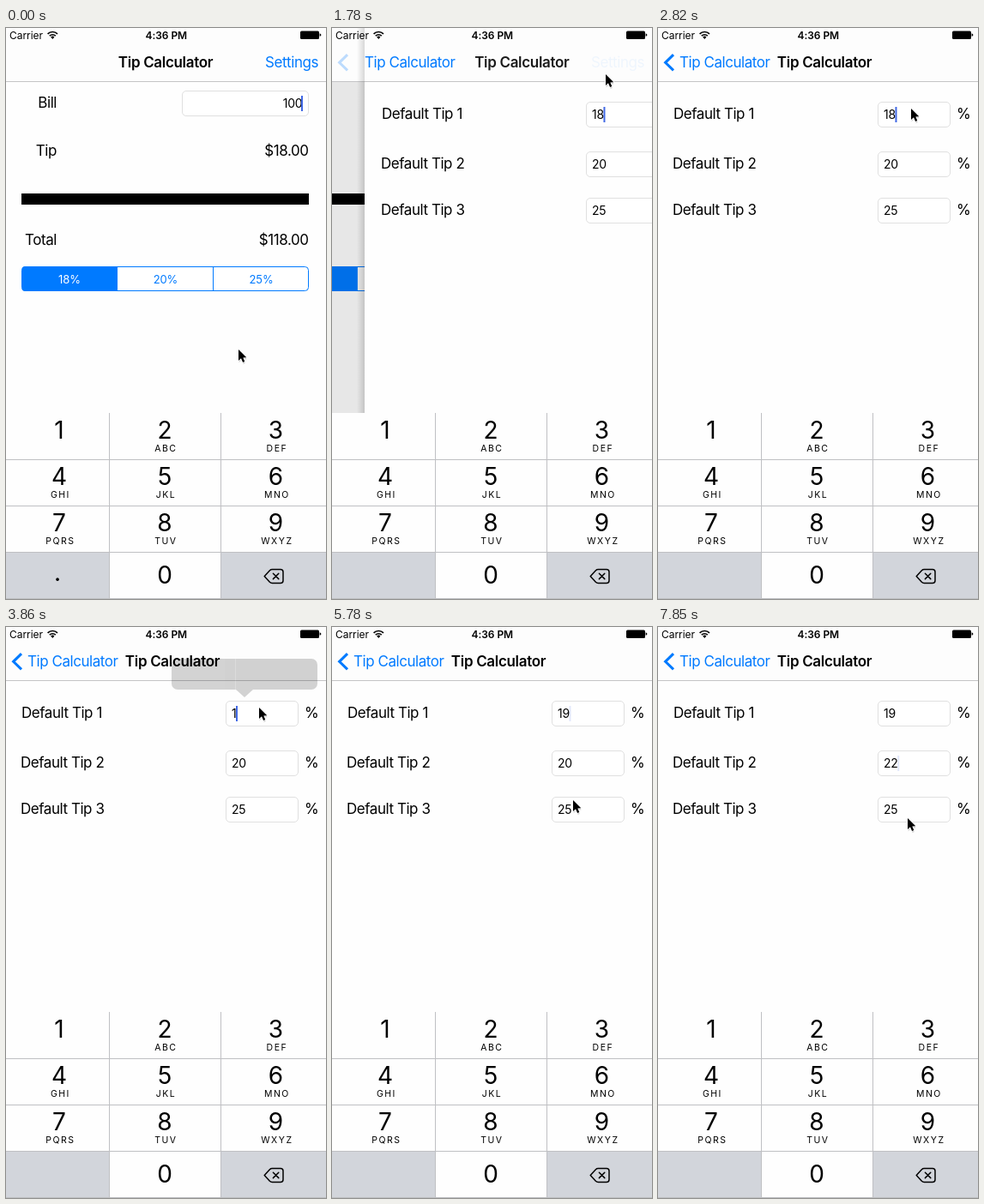
Animation of 373x666 px, one loop 8 s. Source, as an HTML page:

```html
<!DOCTYPE html>
<html lang="en">
<head>
<meta charset="utf-8">
<title>Tip Calculator</title>
<style>
  html, body { margin: 0; width: 100%; height: 100%; overflow: hidden; background: #fefefe; }
  svg { display: block; width: 373px; height: 666px; }
  text { font: 400 17px Inter, Roboto, sans-serif; letter-spacing: -.45px; fill: #000; white-space: pre; }
  .end { text-anchor: end; }
  .mid { text-anchor: middle; }
  .bold { font-weight: 600; letter-spacing: -.32px; }
  .blue { fill: #007aff; }
  .bar { font-size: 12px; letter-spacing: -.05px; }
  .input { font-size: 14px; letter-spacing: -.2px; }
  .seg { font-size: 13px; letter-spacing: -.1px; text-anchor: middle; }
  .digit { font-size: 28px; letter-spacing: 0; text-anchor: middle; }
  .abc { font-size: 10.5px; letter-spacing: 1.5px; text-anchor: middle; }
  .box { fill: #fff; stroke: #e0e0e0; }
  .caret { fill: #4068e4; }
</style>
</head>
<body>
<svg viewBox="0 0 373 666">
  <defs>
    <linearGradient id="edge">
      <stop offset="0" stop-opacity="0"/>
      <stop offset="1" stop-opacity=".15"/>
    </linearGradient>
  </defs>
  <rect width="373" height="666" fill="#fefefe"/>

  <g id="home">
    <text class="end" x="59" y="92.5">Bill</text>
    <rect class="box" x="205.5" y="73.5" width="147" height="29" rx="4.5"/>
    <text class="input end" x="345.5" y="93">100</text>
    <rect class="caret" id="billCaret" x="344" y="79" width="2" height="18"/>
    <text class="end" x="59" y="148.5">Tip</text>
    <text class="end" x="352.5" y="148.5">$18.00</text>
    <rect x="18" y="193" width="335" height="13"/>
    <text class="end" x="59" y="252.5">Total</text>
    <text class="end" x="352.5" y="252.5">$118.00</text>
    <rect x="18.5" y="278.5" width="334" height="28" rx="4" fill="#fff" stroke="#007aff"/>
    <path d="M130 278H22.5a4 4 0 0 0-4 4v21a4 4 0 0 0 4 4H130z" fill="#007aff"/>
    <path d="M241.5 278v29" stroke="#007aff"/>
    <text class="seg" x="74" y="297.5" style="fill:#fff">18%</text>
    <text class="seg blue" x="186" y="297.5">20%</text>
    <text class="seg blue" x="297.5" y="297.5">25%</text>
  </g>
  <rect id="dim" y="63" width="373" height="400"/>

  <g id="settings">
    <rect x="-2" y="63" width="375" height="400" fill="#fefefe"/>
    <g id="rows"></g>
    <rect class="caret" id="tipCaret" width="2" height="18"/>
  </g>

  <rect width="373" height="62" fill="#fdfdfd"/>
  <path d="M0 62.5H373" stroke="#c4c4c6"/>
  <rect id="shadow" x="-11" width="9" height="449" fill="url(#edge)"/>
  <text class="bar" x="4" y="12.5">Carrier</text>
  <g fill="none" stroke="#000" stroke-width="1.7">
    <path d="M48.6 6.9a8 8 0 0 1 11.4 0"/>
    <path d="M50.8 9.2a5 5 0 0 1 7 0"/>
  </g>
  <path d="M52.2 10.6a3 3 0 0 1 4.2 0L54.3 13z"/>
  <text class="bar mid" x="186.8" y="12.5" style="font-weight:600">4:36 PM</text>
  <rect x="343" y="3.5" width="22" height="9.5" rx="1.5"/>
  <path d="M365.6 6.2q1.8 .4 1.8 1.8t-1.8 1.8z"/>

  <text class="bold mid" id="oldTitle" y="46.2">Tip Calculator</text>
  <text class="blue end" id="link" x="364" y="46.2">Settings</text>
  <path id="chevron" d="M18 31.2L8.6 40.3L18 49.4" fill="none" stroke="#007aff" stroke-width="3"/>
  <text class="blue" id="back" y="46.2">Tip Calculator</text>
  <text class="bold mid" id="newTitle" y="46.2">Tip Calculator</text>

  <g id="pad">
    <rect y="449" width="373" height="217" fill="#fefefe"/>
    <path d="M0 612H120V666H0zM251 612H373V666H251z" fill="#d2d5db"/>
    <rect id="nine" x="251" y="558" width="122" height="53" fill="#d2d5db"/>
    <path d="M120.5 449V666M250.5 449V666M0 503.5H373M0 557.5H373M0 611.5H373M0 665.5H373" stroke="#bfc0c3"/>
    <text class="digit" id="dot" x="60" y="645">.</text>
    <g fill="none" stroke="#000" stroke-width="1.5" stroke-linejoin="round" stroke-linecap="round">
      <path d="M301.2 639.5L307.4 632.8Q308.6 631.6 310.2 631.6H320Q323 631.6 323 634.6V644.4Q323 647.4 320 647.4H310.2Q308.6 647.4 307.4 646.2Z"/>
      <path d="M311.4 636.2L317.8 642.6M317.8 636.2L311.4 642.6"/>
    </g>
  </g>

  <g id="menu">
    <path d="M200 37H356a7 7 0 0 1 7 7V66a7 7 0 0 1-7 7H288L278 82L268 73H200a7 7 0 0 1-7-7V44a7 7 0 0 1 7-7z"/>
    <path d="M267.5 37V73" stroke="#fff" stroke-opacity=".25"/>
  </g>

  <g id="cursor">
    <g transform="scale(.86)">
      <path d="M0 0V15.2L3.5 12L5.9 17.4L8.5 16.2L6.2 11L10.8 10.8Z" fill-opacity=".18" transform="translate(.6 2.4)"/>
      <path d="M0 0V15.2L3.5 12L5.9 17.4L8.5 16.2L6.2 11L10.8 10.8Z" stroke="#fff" stroke-width="2" paint-order="stroke"/>
    </g>
  </g>
</svg>
<script>
const $ = id => document.getElementById(id);
const LOOP = 8000, STEPS = 54;

const text = (cls, x, y, s, id = '') =>
  `<text class="${cls}" x="${x}" y="${y}" ${id && `id="${id}"`}>${s}</text>`;

// settings rows, by top of the input box
$('rows').innerHTML = [86, 144, 198].map((top, i) =>
  text('', i ? 17 : 18, top + 20, 'Default Tip ' + (i + 1)) +
  `<rect class="box" x="256.5" y="${top + .5}" width="84" height="29" rx="4.5"/>` +
  text('input', 263, top + 20, 25, 'tip' + (i + 1)) +
  text('', 348, top + 20, '%')).join('');

// number pad
const letters = ['', 'ABC', 'DEF', 'GHI', 'JKL', 'MNO', 'PQRS', 'TUV', 'WXYZ'];
$('pad').insertAdjacentHTML('beforeend', letters.map((s, i) => {
  const x = [62, 185, 314.5][i % 3], y = 479 + 54 * Math.floor(i / 3);
  return text('digit', x, y, i + 1) + text('abc', x + 1.4, y + 15, s);
}).join('') + text('digit', 185, 648, 0));

// cursor moves: first step, last step, where to
const moves = [
  [0, 8, 320, 46], [10, 12, 319, 54], [12, 16, 295, 94], [26, 29, 232, 567],
  [29, 32, 289, 585], [36, 39, 281, 202], [39, 43, 285, 152], [49, 53, 291, 223]
];

const clamp = v => Math.max(0, Math.min(1, v));
const ease = f => f * f * (3 - 2 * f);

const cursorAt = k => moves.reduce(([x, y], [a, b, tx, ty]) => {
  const f = ease(clamp((k - a) / (b - a)));
  return [x + (tx - x) * f, y + (ty - y) * f];
}, [271, 375]);

// share of the push still to go: a critically damped spring
function remaining(k) {
  const u = Math.max(0, k - 9.66) * 1.63;
  return k > 15 ? 0 : (1 + u) * Math.exp(-u);
}

// the last digit is deleted at step a and a new one typed at step b
const edit = (k, from, to, a, b) => k < a ? from : k < b ? from[0] : to;

const shift = (id, x, y = 0) => $(id).setAttribute('transform', `translate(${x} ${y})`);
const fade = (id, o) => $(id).setAttribute('opacity', clamp(o));

function render(t) {
  const k = Math.min(STEPS - 1, Math.floor(t * STEPS / LOOP + .035));
  const p = remaining(k), q = 1 - p;
  const x = k < 10 ? 400 : Math.round(373 * p);

  shift('home', -112 * q);
  fade('dim', .1 * q);
  shift('settings', x);
  shift('shadow', x);

  shift('oldTitle', 186 - 106 * q);
  fade('oldTitle', 1 - 1.8 * q);
  fade('link', p ** 1.3);
  shift('back', 25 + 122 * p);
  fade('back', 1.5 * q);
  fade('chevron', 1 - 7 * p);
  shift('newTitle', 194 + 257 * p);
  fade('newTitle', q);

  $('tip1').textContent = edit(k, '18', '19', 26, 34);
  $('tip2').textContent = edit(k, '20', '22', 46, 47);
  const second = k >= 43, field = $(second ? 'tip2' : 'tip1');
  const blink = k % 7 === 4 ? .15 : 1;
  shift('tipCaret', 262.5 + field.getComputedTextLength(), second ? 150 : 92);
  fade('tipCaret', blink);
  fade('billCaret', blink);

  fade('dot', k < 11 ? 1 : 0);
  fade('nine', k === 34 ? 1 : 0);
  fade('menu', 1 - Math.abs(k - 24) / 2.4);
  shift('cursor', ...cursorAt(k));
}

const start = performance.now();
function tick() {
  render((performance.now() - start) % LOOP);
  requestAnimationFrame(tick);
}
tick();
</script>
</body>
</html>
```
